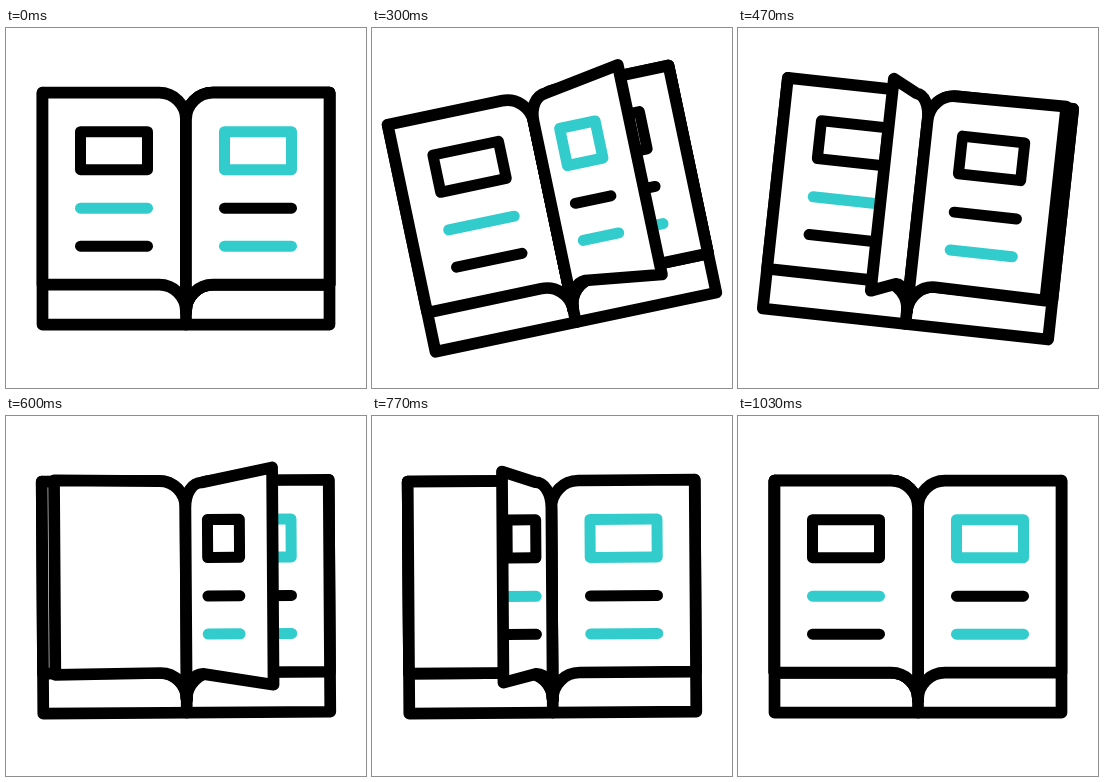
These frames come from a looping animation (360x360 px, 1.67 s). An HTML page with a canvas:

```html
<!DOCTYPE html>
<html>
<head>
<meta charset="utf-8">
<style>
html, body { margin: 0; width: 100%; height: 100%; overflow: hidden; background: #fff; }
canvas { display: block; }
</style>
</head>
<body>
<canvas id="stage" width="360" height="360"></canvas>
<script>
const ctx = document.getElementById('stage').getContext('2d');
const LOOP = 1670, HALF = 143.5, FOLD_X = 54, FOLD_RISE = 20;
const BLACK = '#000', CYAN = '#33cccc';
// colours of the frame and the two text lines on a page
const OLD_LEFT = [BLACK, CYAN, BLACK];
const CYAN_PAGE = [CYAN, BLACK, CYAN];
const BLACK_PAGE = [BLACK, BLACK, CYAN];

// [tick, degrees] of the whole book
const TILT = [[0, 0], [8.3, -12.1], [14.8, 6.5], [18.2, -0.4], [23, -0.4], [31, 0]];

const smooth = u => u * u * u * (10 + u * (6 * u - 15));

function tiltAt(n) {
  const i = Math.max(1, TILT.findIndex(k => k[0] >= n));
  const [t0, a] = TILT[i - 1], [t1, b] = TILT[i];
  return a + (b - a) * smooth((n - t0) / (t1 - t0));
}

// x of the free edge of a turning page: speeds up to the fold, then slows down
function edgeAt(n) {
  const start = 3.2, fold = 11, end = 19;
  if (n <= start) return HALF;
  if (n >= end) return -HALF;
  if (n < fold) return HALF - (HALF - FOLD_X) * ((n - start) / (fold - start)) ** 2;
  const u = (n - fold) / (end - fold);
  return FOLD_X - (HALF + FOLD_X) * (1 - (1 - u) ** 1.335);
}

function pagePath(x) {
  const s = x / HALF;
  const rise = FOLD_RISE * (x > FOLD_X ? (HALF - x) / (HALF - FOLD_X) : (HALF + x) / (HALF + FOLD_X));
  const top = -116 + 0.15 * rise, bottom = 76 + 0.1 * rise;
  const bend = 27 * (s > 0 ? s : -Math.sqrt(-s));
  const p = new Path2D();
  p.moveTo(0, -89);
  p.bezierCurveTo(0, -104, 0.45 * bend, top, bend, top);
  p.lineTo(x, -116 - rise);
  p.lineTo(x, 76 + rise);
  p.lineTo(bend, bottom);
  p.bezierCurveTo(0.45 * bend, bottom, 0, 88, 0, 103);
  p.closePath();
  return p;
}

function line(color, ...points) {
  ctx.strokeStyle = color;
  ctx.beginPath();
  points.forEach(([x, y]) => ctx.lineTo(x, y));
  ctx.stroke();
}

function content(x, colors) {
  const s = Math.abs(x) / HALF, side = Math.sign(x);
  const scale = side > 0 ? 1 - (1 - s) * 1.33 : 0.13 + 0.87 * s;
  if (scale <= 0) return;
  const near = 38.5 - (1 - s) * (side > 0 ? 42 : 34.5);
  const a = side * near, b = side * (near + 67 * scale);
  ctx.strokeStyle = colors[0];
  ctx.strokeRect(Math.min(a, b), -77, Math.abs(b - a), 38);
  line(colors[1], [a, -0.5], [b, -0.5]);
  line(colors[2], [a, 37.5], [b, 37.5]);
}

function page(x, front, back) {
  const path = pagePath(x), colors = x > 0 ? front : back;
  ctx.fill(path);
  if (colors) {
    ctx.save();
    ctx.clip(path);
    ctx.lineWidth = 11;
    content(x, colors);
    ctx.restore();
  }
  ctx.strokeStyle = BLACK;
  ctx.stroke(path);
}

function draw(n) {
  ctx.setTransform(1, 0, 0, 1, 0, 0);
  ctx.fillStyle = '#fff';
  ctx.fillRect(0, 0, 360, 360);
  ctx.translate(180, 180.7);
  ctx.rotate(tiltAt(n) * Math.PI / 180);
  ctx.lineWidth = 11.7;
  ctx.lineCap = ctx.lineJoin = 'round';

  line(BLACK, [-HALF, -116], [-HALF, 116], [HALF, 116], [HALF, -116]);
  line(BLACK, [0, 100], [0, 116]);
  page(-HALF, null, OLD_LEFT);
  page(HALF, CYAN_PAGE);

  const first = edgeAt(n), second = edgeAt(n - 8.6);
  const turnFirst = () => page(first, CYAN_PAGE, null);
  const turnSecond = () => page(second, BLACK_PAGE, OLD_LEFT);
  const order = first > 0 ? [turnSecond, turnFirst] : [turnFirst, turnSecond];
  order.forEach(turn => turn());
}

// 30 ticks a second, at rest from tick 31 on
function tick() {
  const t = performance.now() % LOOP;
  draw(Math.min(31, Math.floor((t + 4) * 0.03)));
  requestAnimationFrame(tick);
}
tick();
</script>
</body>
</html>
```
